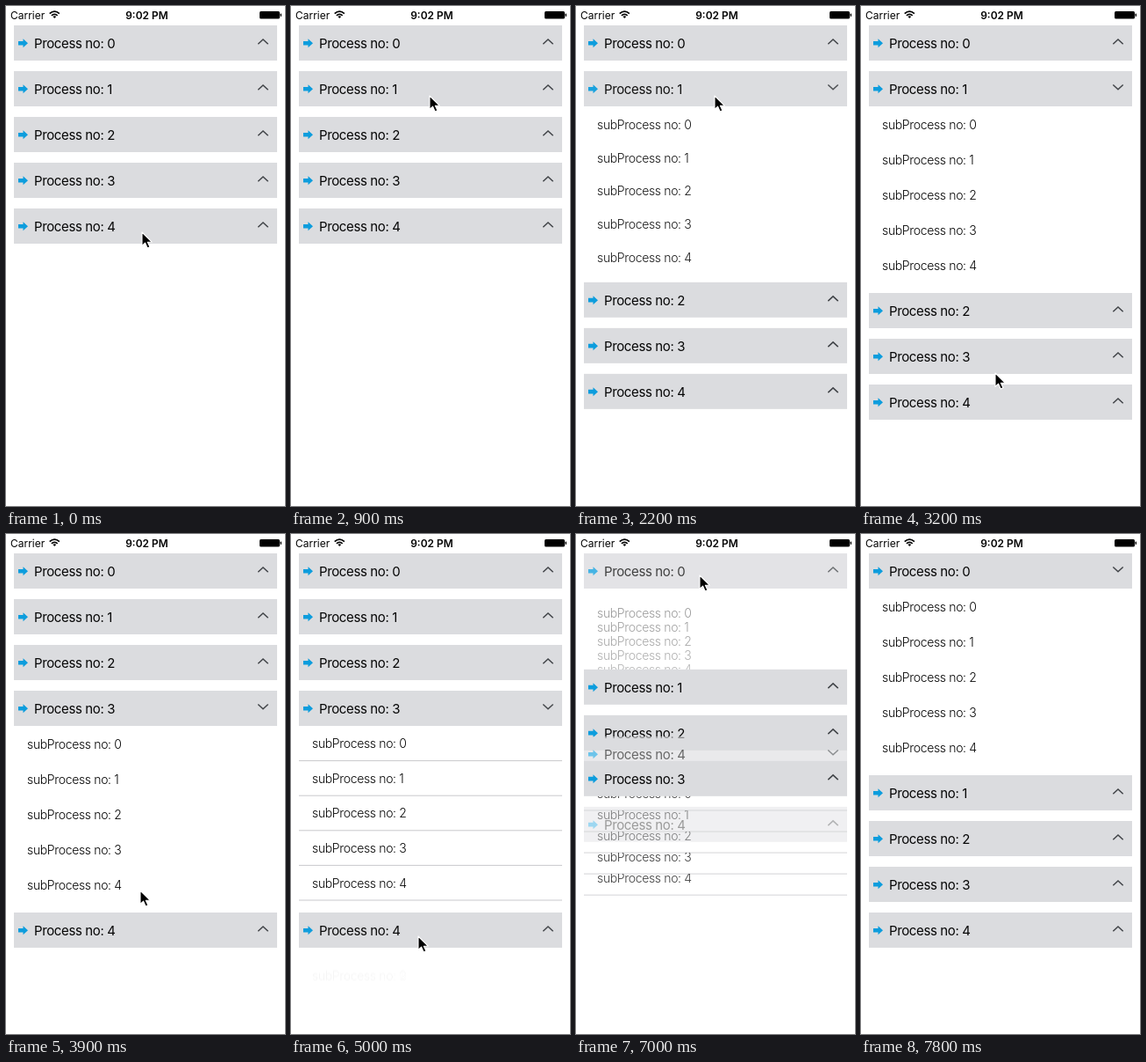
Animation, 318 px wide and 568 px high, one loop 8700 ms. Source, as an HTML page:

```html
<!DOCTYPE html>
<html lang="en">
<head>
<meta charset="utf-8">
<title>Collapsible process list</title>
<style>
  html, body { margin: 0; width: 100%; height: 100%; overflow: hidden; background: #fff; }
  svg { display: block; width: 100vw; height: 100vh; }
  text { font-family: Inter, Roboto, sans-serif; fill: #050505; }
  .head { font-size: 15px; letter-spacing: -.025em; }
  .sub { font-size: 14px; font-weight: 300; letter-spacing: -.025em; }
  .status { font-size: 12px; }
  .clock { font-weight: 600; text-anchor: middle; }
  .chevron { fill: none; stroke: #414448; stroke-width: 1.5; }
  .rule { stroke: #c9c9cc; stroke-width: 1; }
  .wifi { fill: none; stroke: #000; stroke-width: 1.7; }
</style>
</head>
<body>
<svg viewBox="0 0 318 568">
  <g id="list"></g>
  <text class="status" x="5" y="14.5">Carrier</text>
  <g class="wifi">
    <path d="M49.7 8.6Q55.3 3.6 60.9 8.6"/>
    <path d="M51.9 10.9Q55.3 7.8 58.7 10.9"/>
    <path d="M53.4 11.9L55.3 14L57.2 11.9Q55.3 10.4 53.4 11.9Z" fill="#000" stroke="none"/>
  </g>
  <text class="status clock" x="160.5" y="14.5">9:02 PM</text>
  <rect x="289" y="6" width="23" height="8.5" rx="1.5"/>
  <rect x="312.6" y="8.5" width="1.4" height="3.5" rx=".7"/>
  <path id="cursor" d="M0 0V15.5L3.6 12.2L6.2 18L9 16.8L6.4 11.2H11.2Z" stroke="#fff" stroke-width="1.1" stroke-linejoin="round"/>
</svg>
<script>
const LOOP = 8700, STEP = 100, FADE = 340;
const COUNT = 5, ROW = 40, PITCH = 52, TOP = 22;
const NONE = -1;

// Each tap closes the open section and opens another.
const taps = [
  { at: 1911, from: NONE, to: 1 },
  { at: 3560, from: 1, to: 3 },
  { at: 4980, from: 3, to: 4 },
  { at: 6853, from: 4, to: 0 }
];

// time, x, y of the pointer tip
const pointer = [
  [0, 155, 257], [600, 157, 104], [800, 157, 104], [900, 158, 102],
  [2600, 158, 102], [3000, 154, 434], [3200, 153, 417], [3400, 153, 405],
  [4200, 153, 405], [4600, 145, 457], [5600, 145, 457], [5700, 144, 455],
  [6100, 152, 240], [6500, 141, 47], [7500, 141, 47],
  [7700, 265, 120], [7800, 340, 165], [LOOP, 340, 165]
];

const list = document.getElementById('list');
const cursor = document.getElementById('cursor');
const mix = (a, b, p) => a + (b - a) * p;
const ease = p => p * p * (3 - 2 * p);
const clamp = p => Math.max(0, Math.min(1, p));
const headTop = (i, open) => TOP + PITCH * i + (open !== NONE && i > open ? ROW * COUNT : 0);

function header(i, y, isOpen, alpha = 1) {
  const chevron = isOpen ? 'M287.3 37.5L293 42.8L298.7 37.5' : 'M287.3 43.3L293 38L298.7 43.3';
  return `<g opacity="${alpha}" transform="translate(0 ${y - TOP})">
    <rect x="9" y="22" width="300" height="40" fill="#dbdcdf"/>
    <path d="M14 40H19.5V37.3L25 42.3L19.5 47.3V44.6H14Z" fill="#0d9ddd"/>
    <text class="head" x="32" y="47.8">Process no: ${i}</text>
    <path class="chevron" d="${chevron}"/></g>`;
}

function rowText(i, centre, alpha) {
  return `<text class="sub" x="24" y="${centre + 5}" opacity="${alpha}">subProcess no: ${i}</text>`;
}

function openingRows(top, p) {
  let out = '';
  for (let i = 0; i < COUNT; i++) {
    const alpha = p * (1 - .12 * i * (1 - p));
    out += rowText(i, top + ROW * p * i + 20.5 + 13 * (1 - p), alpha);
  }
  return out;
}

function closingRows(top, shift, p) {
  const height = ROW * (1 - p);
  let out = '';
  for (let i = 0; i < COUNT; i++) {
    const y = top + shift * p / 4 + height * i, bottom = y + height;
    out += `<svg x="0" y="${y}" width="318" height="${height}">${rowText(i, 20.5 - 38 * p, 1 - p * .6)}</svg>
      <path class="rule" d="M9 ${bottom}H309" opacity="${1 - p * .5}"/>`;
  }
  return out;
}

function drawList(t) {
  const tap = taps.filter(k => k.at <= t).pop() || { at: 0, from: NONE, to: NONE };
  const p = ease(clamp((t - tap.at) / FADE));
  const busy = p < 1 && tap.to !== NONE;
  const { from, to } = tap;
  const yOf = i => mix(headTop(i, from), headTop(i, to), p);
  const changed = i => busy && (i === from || i === to);
  const ghost = i => changed(i) ? header(i, headTop(i, from), i === from, 1 - p) : '';

  let out = '';
  if (busy && from !== NONE) {
    const start = headTop(from, from);
    out += closingRows(start + ROW, headTop(from, to) - start, p);
  }
  if (to !== NONE) out += openingRows(yOf(to) + ROW, p);
  out += ghost(0);
  for (let i = 0; i < COUNT; i++) {
    out += ghost(i + 1) + header(i, yOf(i), i === to && p > .5, changed(i) ? p : 1);
  }
  list.innerHTML = out;
}

function drawCursor(t) {
  const n = pointer.findIndex(k => k[0] > t);
  const [t0, x0, y0] = pointer[n - 1], [t1, x1, y1] = pointer[n];
  const p = (t - t0) / (t1 - t0);
  cursor.setAttribute('transform', `translate(${mix(x0, x1, p)} ${mix(y0, y1, p)})`);
}

let shown = -1;
function tick() {
  const t = Math.floor(performance.now() % LOOP / STEP) * STEP;
  if (t !== shown) {
    shown = t;
    drawList(t);
    drawCursor(t);
  }
  requestAnimationFrame(tick);
}
tick();
</script>
</body>
</html>
```
